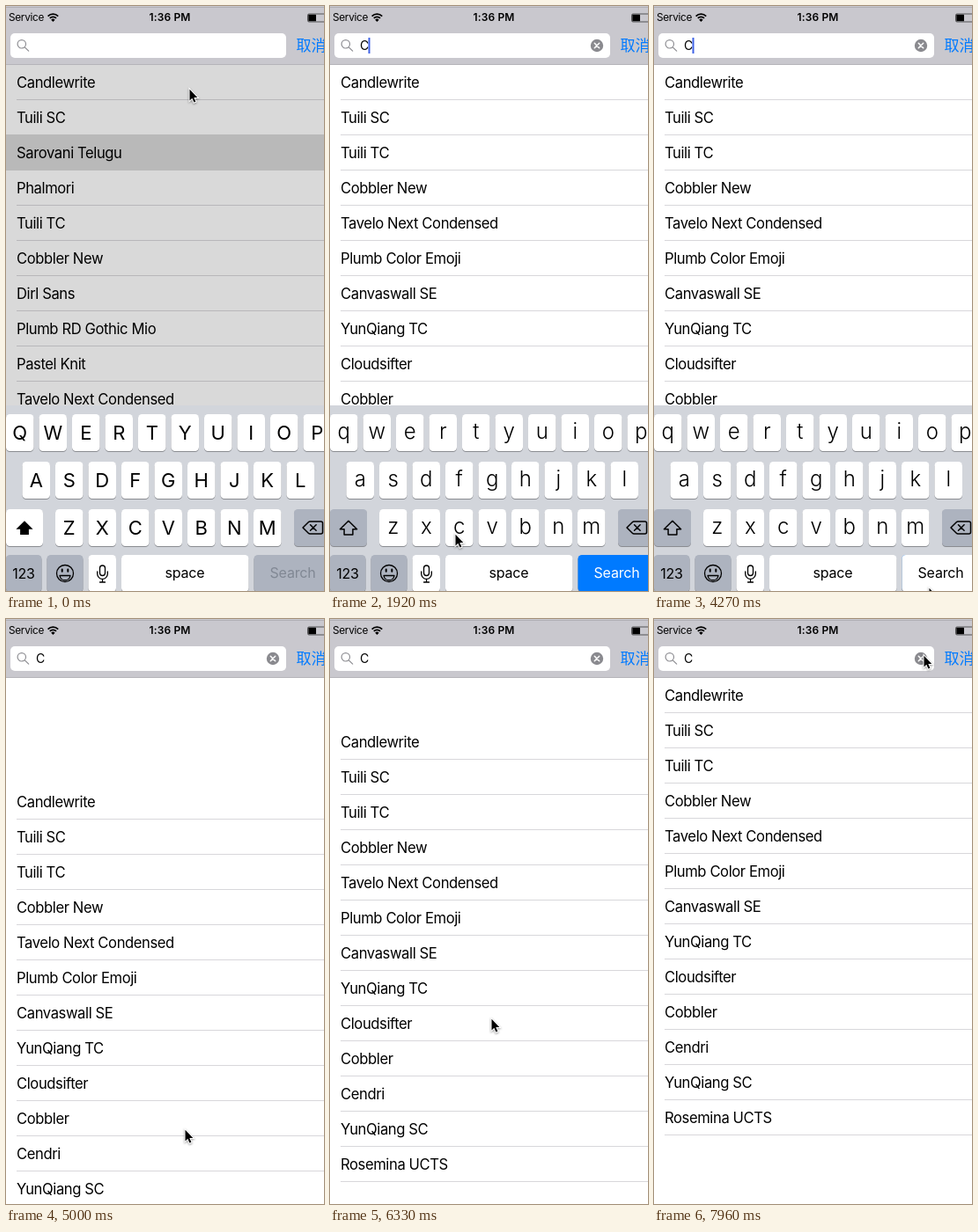
Write an HTML page that moves like this. It is 361 px wide and 665 px high and loops after 8 s.

```html
<!DOCTYPE html>
<html lang="en">
<head>
<meta charset="utf-8">
<title>Font search</title>
<style>
html, body { margin: 0; width: 100%; height: 100%; overflow: hidden; background: #fff; }
svg { display: block; font-family: Inter, "Open Sans", sans-serif; }
text { white-space: pre; }
.mid { text-anchor: middle; }
.row { font-size: 16.6px; letter-spacing: -.4px; }
.line { fill: #d8d7db; }
.upper { font-size: 22px; }
.lower { font-size: 24px; font-weight: 300; }
.label { font-size: 16px; letter-spacing: -.2px; }
.clock { font-size: 12px; font-weight: 600; letter-spacing: .15px; }
.cancel { font: 17px "Noto Sans CJK SC", "Noto Sans CJK", sans-serif; fill: #007aff; }
.stroke { fill: none; stroke: #000; stroke-width: 1.5; stroke-linecap: round; stroke-linejoin: round; }
.wifi { fill: none; stroke: #000; stroke-width: 1.8; }
.lens { stroke: #8e8e93; stroke-width: 1.2; }
.cross { stroke: #fff; }
.thin { stroke-width: 1.3; }
.arrow { stroke: #fff; stroke-width: 2; paint-order: stroke; filter: drop-shadow(0 1px 1px rgba(0, 0, 0, .4)); }

.before, .after, #pressed, #caret, #hits, #keys, #pointer {
  animation: 8s step-end infinite;
}
.before { animation-name: before; }
.after { animation-name: after; }
#pressed { animation-name: pressed; }
#caret { animation-name: caret; }
#hits { animation-name: scroll; }
#keys { animation-name: keys; }
#pointer { animation-name: pointer; }

@keyframes before { 0% { opacity: 1; } 18.5%, 100% { opacity: 0; } }
@keyframes after { 0% { opacity: 0; } 18.5%, 100% { opacity: 1; } }
@keyframes pressed { 0%, 55.15%, 100% { opacity: 0; } 53.35% { opacity: 1; } }
@keyframes caret {
  0%, 14.75% { opacity: 0; transform: translateX(0); }
  7.35% { opacity: 1; transform: translateX(0); }
  18.5%, 33.25%, 44.25%, 53.35% { opacity: 1; transform: translateX(10px); }
  29.6%, 38.85%, 49.7%, 55.15%, 100% { opacity: 0; transform: translateX(10px); }
}
/* drags are stepped, releases spring back */
@keyframes scroll {
  0% { transform: translateY(0); }
  33.25% { transform: translateY(0); animation-timing-function: steps(3); }
  38.85% { transform: translateY(-86px); }
  40.65% { transform: translateY(-34px); }
  42.5% { transform: translateY(-9px); }
  44.25% { transform: translateY(0); }
  60.6% { transform: translateY(67px); }
  62.48% { transform: translateY(121px); }
  64.4% { transform: translateY(52px); }
  66.25% { transform: translateY(16px); }
  68.1% { transform: translateY(4px); }
  70% { transform: translateY(0); }
  73.6% { transform: translateY(0); animation-timing-function: steps(3); }
  79.1% { transform: translateY(53px); }
  82.87% { transform: translateY(64px); }
  84.75% { transform: translateY(28px); }
  86.6% { transform: translateY(9px); }
  88.4% { transform: translateY(2px); }
  90.3%, 100% { transform: translateY(0); }
}
@keyframes keys {
  0% { transform: translateY(0); }
  53.35% { transform: translateY(0); animation-timing-function: steps(2); }
  57%, 100% { transform: translateY(212px); }
}
@keyframes pointer {
  0% { transform: translate(208px, 94px); animation-timing-function: steps(8); }
  14.75% { transform: translate(142px, 600px); }
  27.75% { transform: translate(142px, 600px); animation-timing-function: steps(3); }
  33.25% { transform: translate(180px, 279px); animation-timing-function: steps(3); }
  38.85% { transform: translate(180px, 97px); }
  42.5% { transform: translate(180px, 97px); animation-timing-function: steps(5); }
  51.5% { transform: translate(312px, 661px); }
  53.35% { transform: translate(312px, 661px); animation-timing-function: steps(2); }
  57% { transform: translate(203px, 314px); }
  58.8% { transform: translate(203px, 314px); animation-timing-function: steps(2); }
  62.48% { transform: translate(203px, 580px); }
  64.4% { transform: translate(203px, 580px); animation-timing-function: steps(5); }
  73.6% { transform: translate(183px, 350px); animation-timing-function: steps(3); }
  79.1% { transform: translate(183px, 454px); }
  82.87% { transform: translate(183px, 478px); }
  84.75% { transform: translate(183px, 478px); animation-timing-function: steps(6); }
  95.7% { transform: translate(280px, 50px); animation-timing-function: steps(2); }
  99.48%, 100% { transform: translate(306px, 41px); }
}
</style>
</head>
<body>
<svg width="361" height="665" viewBox="0 0 361 665">
  <rect width="361" height="665" fill="#fff"/>

  <g id="hits"></g>
  <g class="before">
    <rect y="67" width="361" height="598" fill="#fff"/>
    <g id="all"></g>
    <rect y="67" width="361" height="598" opacity=".15"/>
  </g>

  <g id="bar">
    <rect width="361" height="66" fill="#c9c8ce"/>
    <rect y="1" width="361" height="1" fill="#b0afb4"/>
    <rect y="66" width="361" height="1" fill="#b5b4b9"/>
    <text x="3" y="17.3" font-size="11.8" letter-spacing="-.3">Service</text>
    <path class="wifi" d="M47.6 11.6a8.2 8.2 0 0 1 11.6 0M49.8 13.9a5.1 5.1 0 0 1 7.2 0"/>
    <path d="M53.4 18l-2.2-2.3a3.1 3.1 0 0 1 4.4 0z"/>
    <text class="mid clock" x="186" y="17.4">1:36 PM</text>
    <rect x="342.5" y="9" width="24" height="9" rx="1.5" fill="none" stroke="#000" stroke-width=".6"/>
    <rect x="343.3" y="9.8" width="8.7" height="7.4" rx=".5"/>
    <rect x="5" y="31" width="313" height="28" rx="5" fill="#fff"/>
    <g class="stroke lens">
      <circle cx="17.8" cy="43.3" r="4.7"/>
      <path d="M21.3 46.8l4.4 4.4"/>
    </g>
    <text class="cancel" x="329.4" y="50.5">取消</text>
    <g class="after">
      <text x="34" y="50" font-size="14">C</text>
      <circle cx="303" cy="45" r="7.2" fill="#8a8a8f"/>
      <path class="stroke cross" d="M300.3 42.3l5.4 5.4m0-5.4l-5.4 5.4"/>
    </g>
    <rect id="caret" x="33.5" y="36" width="2" height="18" fill="#3f62e6"/>
  </g>

  <g id="keys">
    <rect y="454" width="361" height="212" fill="#d2d5db"/>
    <g id="caps"></g>
    <path class="before" d="M21 585.3l9.6 9.4h-4.7v6.3h-9.8v-6.3h-4.7z"/>
    <g class="after">
      <path class="stroke" d="M21 585.3l9.6 9.4h-4.7v6.3h-9.8v-6.3h-4.7z"/>
    </g>
    <path class="stroke" d="M337 593l6.3-6.3q.7-.7 1.7-.7h12.5q2 0 2 2v10q0 2-2 2h-12.5q-1 0-1.7-.7zM345.5 589.7l6.6 6.6m0-6.6l-6.6 6.6"/>
    <text class="mid label" x="20" y="651">123</text>
    <g class="stroke thin">
      <circle cx="67" cy="645" r="9.5"/>
      <path d="M61 647.5h12q-1 5.2-6 5.2t-6-5.2z"/>
      <path d="M63.7 640.5v2.2M70.3 640.5v2.2" stroke-width="2"/>
      <rect x="106.5" y="636" width="6" height="11.5" rx="3"/>
      <path d="M103.7 643v2.5a5.8 5.8 0 0 0 11.6 0V643M109.5 651.5v3.5m-3 0h6"/>
    </g>
    <text class="mid label" x="203" y="650">space</text>
  </g>

  <g id="pointer">
    <path class="arrow" d="M.5 .8v12.6l2.8-2.7 2.1 4.9 2-.9-2.1-4.7h4z"/>
  </g>
</svg>

<script>
const GRAY = "#adb3bf";
const $ = id => document.getElementById(id);

function add(parent, tag, attrs, text = "") {
  const el = document.createElementNS("http://www.w3.org/2000/svg", tag);
  for (const k in attrs) el.setAttribute(k, attrs[k]);
  el.textContent = text;
  return parent.appendChild(el);
}

function fillList(group, names, selected = -1) {
  names.forEach((name, i) => {
    const y = 67 + 40 * i;
    add(group, "rect", { class: "line", x: 12, y: y + 39, width: 349, height: 1 });
    if (i === selected)
      add(group, "rect", { y: y - 1, width: 361, height: 41, fill: "#d9d9d9" });
    add(group, "text", { class: "row", x: 12, y: y + 26 }, name);
  });
}

fillList($("all"), [
  "Candlewrite", "Tuili SC", "Sarovani Telugu", "Phalmori", "Tuili TC",
  "Cobbler New", "Dirl Sans", "Plumb RD Gothic Mio", "Pastel Knit",
  "Tavelo Next Condensed"
], 2);
fillList($("hits"), [
  "Candlewrite", "Tuili SC", "Tuili TC", "Cobbler New", "Tavelo Next Condensed",
  "Plumb Color Emoji", "Canvaswall SE", "YunQiang TC", "Cloudsifter", "Cobbler",
  "Cendri", "YunQiang SC", "Rosemina UCTS"
]);

const layer = cls => add($("caps"), "g", { class: cls });
const base = layer("base"), before = layer("before"), after = layer("after");

function key(parent, x, y, width, fill = "#fff") {
  add(parent, "rect", { x, y: y + 1, width, height: 42, rx: 4.5, fill: "#8a8c91" });
  add(parent, "rect", { x, y, width, height: 42, rx: 4.5, fill });
}

[["QWERTYUIOP", 0, 464], ["ASDFGHJKL", 18.5, 518], ["ZXCVBNM", 56, 572]]
  .forEach(([letters, left, top]) => [...letters].forEach((ch, i) => {
    const x = left + 37.5 * i, mid = x + 15.75;
    key(base, x, top, 31.5);
    add(before, "text", { class: "mid upper", x: mid, y: top + 29 }, ch);
    add(after, "text", { class: "mid lower", x: mid, y: top + 27.5 }, ch.toLowerCase());
  }));

key(before, 0, 572, 42);
key(after, 0, 572, 42, GRAY);
key(base, 327, 572, 42, GRAY);
key(base, 0, 624, 40.5, GRAY);
key(base, 46.5, 624, 41, GRAY);
key(base, 93.5, 624, 31.5);
key(base, 131, 624, 144.5);

function searchKey(parent, fill, color) {
  key(parent, 281.5, 624, 88, fill);
  add(parent, "text", { class: "mid label", x: 325.5, y: 650, fill: color }, "Search");
}
searchKey(before, GRAY, "#818894");
searchKey(after, "#007aff", "#fff");
searchKey(add($("caps"), "g", { id: "pressed" }), "#fff", "#000");
</script>
</body>
</html>
```
